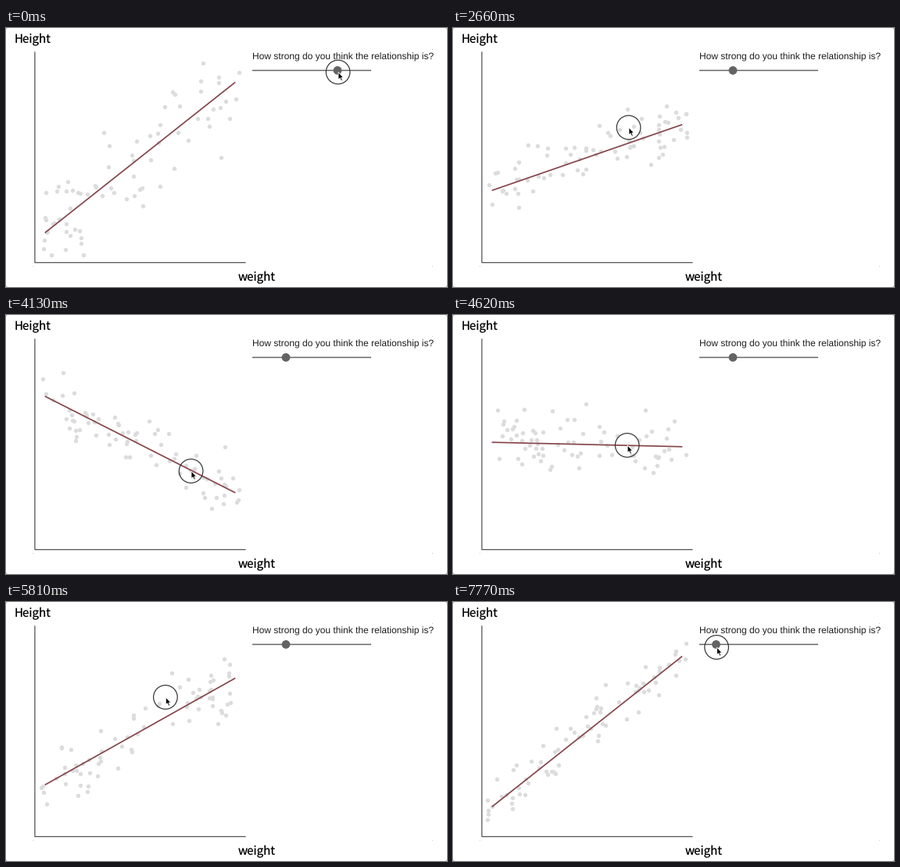
A matplotlib script for the animation above (8 s loop, 564 px wide and 332 px high).

```python
import numpy as np
import matplotlib.pyplot as plt
from matplotlib.animation import FuncAnimation
from matplotlib.patches import Circle, FancyBboxPatch, Polygon, Rectangle

plt.rcParams["text.hinting"] = "none"
plt.rcParams["text.hinting_factor"] = 1

W, H = 564, 332
LOOP, STEP, TICK = 8000, 20, 70
N_POINTS = 74
MID_X, MID_Y = 171.5, 166
ENDS = np.array([50.5, 292.5])
RAIL, RAIL_Y = (315, 467), 54.4
STEEP = -0.793
SANS, HUMANIST = "Liberation Sans", "Noto Sans CJK JP"

# while the mouse drags, every tick draws a new sample
RESAMPLE = [(980, 1190), (1400, 1400), (1820, 3010), (3150, 5320),
            (5600, 6370), (6930, 7770)]
PRESSED = [(0, 1400), (1820, 6370), (7070, LOOP)]

# first value, then moves as (begin, end, new value); equal times are a cut
SLOPE = [STEEP, (1400, 1400, -0.347), (3080, 3430, 0.508),
         (4410, 4830, -0.397), (5530, 6160, STEEP)]
KNOB = [424, (910, 1190, 433), (1400, 1400, 358), (7000, 7770, 336.5)]
CURSOR = [(425, 56.5), (910, 1190, (434, 56.5)), (1400, 1400, (286.5, 287)),
          (1400, 1900, (225, 127.5)), (3080, 3430, (237, 200)),
          (4410, 4900, (204.3, 122)), (6370, 6790, (358, 62)),
          (7000, 7770, (337.5, 58))]

ARROW = np.array([(0, 0), (0, 9.6), (2.1, 7.7), (3.7, 11.2), (5.3, 10.5),
                  (3.8, 7.1), (6.6, 7.1)])


def smooth(t, begin, end):
    if begin == end:
        return float(t >= begin)
    u = np.clip((t - begin) / (end - begin), 0, 1)
    return u * u * (3 - 2 * u)


def at(track, t):
    value = np.asarray(track[0], float)
    for begin, end, goal in track[1:]:
        value = value + (np.asarray(goal) - value) * smooth(t, begin, end)
    return value


def line_y(x, t):
    return MID_Y + at(SLOPE, t) * (x - MID_X)


def sample(t):
    """Points scattered about the line, tighter for a lower slider value."""
    rng = np.random.default_rng(t + 11)
    share = (at(KNOB, t) - RAIL[0]) / (RAIL[1] - RAIL[0])
    x = rng.uniform(44, 299, N_POINTS)
    spread = np.clip(rng.normal(0, 1, N_POINTS), -2.6, 2.6)
    return x, line_y(x, t) + spread * (12 + 28 * share)


DRAWS = [0] + [t for a, b in RESAMPLE for t in range(a, b + 1, TICK)]
CLOUDS = {t: sample(t) for t in DRAWS}

fig = plt.figure(figsize=(W / 72, H / 72), dpi=72, facecolor="#c4c4c4")
ax = fig.add_axes([0, 0, 1, 1])
ax.set_xlim(0, W)
ax.set_ylim(H, 0)
ax.axis("off")

ax.add_patch(FancyBboxPatch((0, 0), W, H, fc="white", ec="none", zorder=0,
                            boxstyle="round,pad=0,rounding_size=3"))

# chart frame and labels
ax.plot([36.9, 36.9, 306], [31, 300.7, 300.7], color="#4a4a4a", lw=1.2,
        zorder=2, snap=False)
ax.plot([34, 545, 545], [305, 305, 27], "o", ms=1, mew=0, color="#bbbbbb")
ax.text(11, 19.4, "Height", fontsize=15.1, family=HUMANIST, color="black")
ax.text(296.5, 324.5, "weight", fontsize=15.1, family=HUMANIST, color="black")
ax.text(315, 40.8, "How strong do you think the relationship is?",
        fontsize=11.65, family=SANS, color="#1c1c1c")
ax.plot(RAIL, [RAIL_Y] * 2, color="#666666", lw=1.5, zorder=4,
        solid_capstyle="butt", snap=False)

dots, = ax.plot([], [], "o", ms=5.4, mew=0, color="#dcdcdc", zorder=1)
dots.set_clip_path(Rectangle((34, 27), 511, 279, transform=ax.transData))
trend, = ax.plot([], [], color="#85444a", lw=1.7, zorder=3)
knob = ax.add_patch(Circle((0, 0), 5.4, fc="#636363", ec="none", zorder=5))
ring = ax.add_patch(Circle((0, 0), 15.3, fill=False, ec="#333333", lw=1.2,
                           zorder=6))
arrow = ax.add_patch(Polygon(ARROW, fc="black", ec="white", lw=0.8, zorder=7))


def update(k):
    t = k * STEP + STEP // 2
    dots.set_data(*CLOUDS[max(d for d in DRAWS if d <= t)])
    trend.set_data(ENDS, line_y(ENDS, t))
    knob.center = (at(KNOB, t), RAIL_Y)
    x, y = at(CURSOR, t)
    ring.center = (x - 0.4, y)
    ring.set_visible(any(a <= t < b for a, b in PRESSED))
    arrow.set_xy(ARROW + (x, y))
    return dots, trend, knob, ring, arrow


anim = FuncAnimation(fig, update, frames=LOOP // STEP, interval=STEP,
                     repeat=True, repeat_delay=0, blit=False)
plt.show()
```
